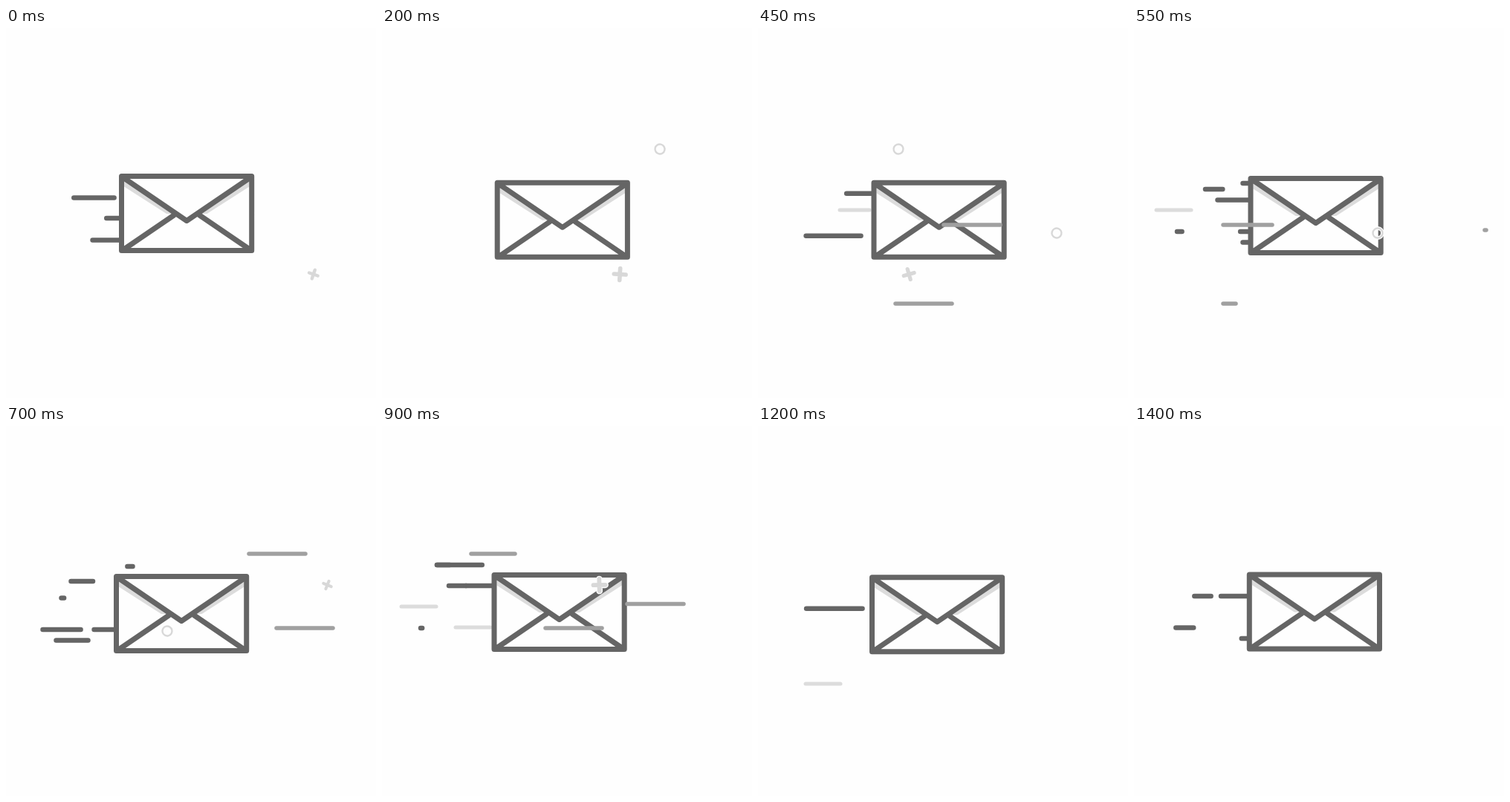
Write an HTML page that moves like this. It is 498 px wide and 498 px high and loops after 1450 ms.

```html
<!DOCTYPE html>
<html lang="en">
<head>
<meta charset="utf-8">
<title>Flying envelope</title>
<style>
html, body { margin: 0; width: 100%; height: 100%; overflow: hidden; background: #fefefe; }
svg { display: block; width: 100vw; height: 100vh; }
path, line { stroke-linecap: round; stroke-linejoin: round; }
</style>
</head>
<body>
<svg viewBox="0 0 498 498">
  <g id="back"></g>
  <g id="mail">
    <g id="trails"></g>
    <path d="M155.500 199.500H330.700V299.500H155.500Z" fill="#fefefe"/>
    <path d="M159 204V213.500L216 250H228ZM327.500 204V213.500L270.500 250H258.500Z" fill="#dcdcdc"/>
    <path d="M155.500 199.500H330.700V299.500H155.500ZM158 201.500L243.200 259.500L328.500 201.500M158.500 298L226 252M328 298L260.500 252" fill="none" stroke="#656565" stroke-width="7"/>
  </g>
  <g id="front"></g>
</svg>
<script>
const LOOP = 1450, STEP = 50;
const $ = id => document.getElementById(id);
const clamp = (v, a, b) => Math.min(b, Math.max(a, v));
const smooth = p => { p = clamp(p, 0, 1); return p * p * (3 - 2 * p); };

function set(el, attrs) {
  for (const k in attrs) el.setAttribute(k, attrs[k]);
}
function make(tag, parent, attrs = {}) {
  const el = document.createElementNS('http://www.w3.org/2000/svg', tag);
  parent.append(el);
  set(el, attrs);
  return el;
}
const stroke = (layer, color, width) =>
  make('line', $(layer), { stroke: color, 'stroke-width': width });

function span(el, head, tail, y) {
  set(el, { x1: head, x2: tail, y1: y, y2: y, display: tail - head >= 2 ? 'inline' : 'none' });
}

// Envelope drift through a few poses: time, dx, dy
const poses = [[0, 0, 0], [350, -.5, 14.5], [550, 1.5, 3], [700, -7, 3],
  [900, -4.5, 1], [1200, -2, 4.2], [LOOP, 0, 0]];

function drift(t) {
  const i = poses.findIndex(p => p[0] > t);
  const a = poses[i - 1], b = poses[i];
  const p = smooth((t - a[0]) / (b[0] - a[0]));
  return [1, 2].map(k => a[k] + (b[k] - a[k]) * p);
}

// Lanes of speed lines: y, reach, then birth times
const trails = [
  [186, 99, 690, 743],
  [206, 59, 530],
  [214, 59, 368, 718, 815],
  [228.5, 72, 468, 1208, 1330],
  [241.5, 100, 1080],
  [256, 59, 1407],
  [271, 97, 322, 533, 660, 1200],
  [285.5, 79, 210, 535, 1385]
].flatMap(([y, reach, ...births]) => births.map(birth =>
  ({ y, reach, birth, el: stroke('trails', '#656565', 6.5) })));

// The head shoots out of the envelope, the tail lets go later and catches up
function drawTrail({ y, reach, birth, el }, t) {
  const age = (t - birth + LOOP) % LOOP / STEP;
  const start = y < 196 ? 177.5 : 153.5;
  span(el, start - reach * Math.min(1, .36 * age), start - reach * smooth((age - 1.7) / 3.4), y);
}

// Wind of fixed length seen through a window: time, x, y, speed per step
const strong = { layer: 'front', color: '#a0a0a0', width: 5.5, len: 76, from: 474, to: 120 };
const faint = { layer: 'back', color: '#dcdcdc', width: 5, len: 47, from: 150, to: 15 };
const gusts = [
  [strong, 350, 390, 265, 70],
  [strong, 350, 309, 371, 62],
  [strong, 700, 327, 172, 56],
  [strong, 700, 364, 272, 36],
  [strong, 900, 330, 239.5, 60],
  [faint, 550, 30, 245, 40],
  [faint, 900, 26, 243, 40],
  [faint, 900, 99, 271, 40],
  [faint, 1200, 64, 347, 40]
].map(([kind, time, x, y, speed]) =>
  ({ kind, time, x, y, speed, el: stroke(kind.layer, kind.color, kind.width) }));

const slide = ({ time, x, speed }, t) => x - speed * (t - time) / STEP;

function drawGust(g, t) {
  const { len, from, to } = g.kind;
  const x = slide(g, t);
  span(g.el, Math.max(to, x), Math.min(from, x + len), g.y);
}

// Rings and sparkles: time, x, y, speed per step
const ring = { d: 'M-6.5 0A6.5 6.5 0 1 1 6.5 0A6.5 6.5 0 1 1-6.5 0Z', width: 2.4 };
const star = { d: 'M0-7V7M-7 0H7', width: 5 };
const bits = [
  [ring, 350, 263, 163, 37],
  [ring, 550, 328, 276, 37],
  [star, 350, 250, 331.5, 23.4],
  [star, 700, 432.5, 214, 35]
].map(([kind, time, x, y, speed]) => {
  const el = make('g', $('front'));
  const { d, width } = kind;
  make('path', el, { d, fill: 'none', stroke: '#fefefe', 'stroke-width': width + 2.5 });
  make('path', el, { d, fill: 'none', stroke: '#d8d8d8', 'stroke-width': width });
  return { kind, time, x, y, speed, el };
});

function drawBit(b, t) {
  const x = slide(b, t);
  const size = b.kind === star ? .65 + .5 * Math.sin(Math.PI * (470 - x) / 370) : 1;
  set(b.el, {
    display: x > 160 && x < 470 ? 'inline' : 'none',
    transform: `translate(${x} ${b.y}) rotate(${(x - 300) / 6}) scale(${size})`
  });
}

function draw(t) {
  set($('mail'), { transform: `translate(${drift(t)})` });
  trails.forEach(o => drawTrail(o, t));
  gusts.forEach(o => drawGust(o, t));
  bits.forEach(o => drawBit(o, t));
}

const begin = performance.now();
function tick() {
  const t = (performance.now() - begin) % LOOP;
  draw(Math.floor(t / STEP) * STEP);
  requestAnimationFrame(tick);
}
tick();
</script>
</body>
</html>
```
